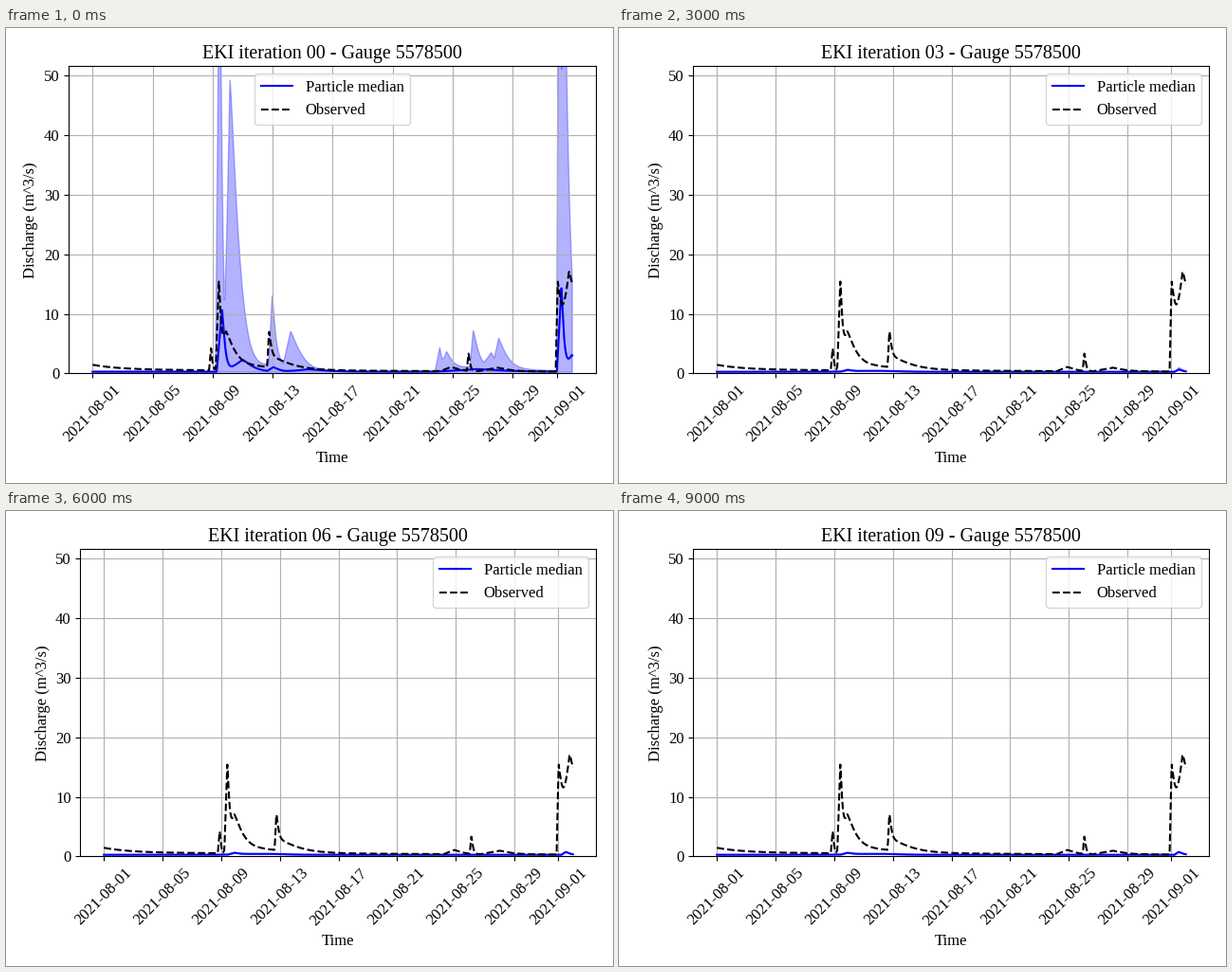
Recreate the animation shown at these times as a matplotlib script. Size 640 by 480 pixels, loop 10000 ms.

```python
import numpy as np
import matplotlib.pyplot as plt
from matplotlib.animation import FuncAnimation

W, H, DPI = 640, 480, 100
N_ITER, STEP_MS = 10, 1000
Y_MAX = 51.57
TICKS = list(range(0, 29, 4)) + [31]

plt.rcParams.update({"font.family": "Liberation Serif", "font.size": 12})

fig, ax = plt.subplots(figsize=(W / DPI, H / DPI), dpi=DPI)
days = np.linspace(0, 31.99, 32 * 48)


def date(day):
    month, day = divmod(day, 31)
    return f"2021-{8 + month:02d}-{day + 1:02d}"


def pulse(peak, height, rise, fall):
    """Flood wave: linear rise to the peak day, then a stretched decay."""
    dt = days - peak
    ramp = np.clip(1 + dt / rise, 0, 1)
    return height * ramp * np.exp(-(np.maximum(dt, 0) / fall) ** 1.3)


def flow(base, *events):
    return base + sum(pulse(*e) for e in events)


# Events are (peak day, height, rise days, fall days)
observed = flow(
    0.6 + 0.85 * np.exp(-days / 1.9) - 0.009 * days,
    (7.9, 3.7, 0.13, 0.1), (8.42, 12.6, 0.2, 0.15),
    (8.9, 5.1, 0.75, 0.65), (8.9, 1.3, 0.75, 3.3),
    (11.76, 4.2, 0.13, 0.16), (11.78, 2, 0.1, 1.5),
    (23.9, 0.7, 0.7, 0.6), (25.06, 3, 0.1, 0.13), (27, 0.6, 1.3, 0.9),
    (31.02, 15.3, 0.14, 0.28), (31.77, 16.4, 0.72, 1.1))

prior_upper = flow(
    0.4,
    (8.47, 78, 0.27, 0.2), (9.16, 48.5, 0.36, 0.7), (12.4, 1.4, 2, 0.6),
    (11.98, 11.5, 0.25, 0.26), (13.2, 6.3, 0.5, 0.85),
    (25.5, 0.8, 2.9, 3), (23.15, 3.8, 0.3, 0.2), (23.6, 2.8, 0.3, 0.5),
    (25.38, 6, 0.22, 0.4), (26.57, 2.4, 0.5, 0.4), (27.08, 4.4, 0.3, 0.7),
    (31.1, 85, 0.17, 0.3), (31.42, 55, 0.13, 0.45))

prior_median = flow(
    0.28,
    (8.63, 10.4, 0.35, 0.23), (10, 2, 1.1, 0.8), (12.05, 0.7, 0.4, 0.5),
    (14.35, 0.4, 1.6, 1.6), (25.6, 0.45, 2.8, 2.2),
    (31.26, 14, 0.3, 0.2), (31.95, 2.7, 0.5, 1))

first, last = pulse(8.9, 1, 0.45, 0.45), pulse(31.5, 1, 0.3, 0.33)
swell = 0.16 * np.exp(-((days - 10.8) / 2) ** 2)


def ensemble(k):
    """Lower, median and upper discharge for one iteration."""
    if k == 0:
        return np.full_like(days, 0.2), prior_median, prior_upper
    spread = np.exp(-0.8 * (k - 1))
    median = (0.28 + swell + (0.28 - 0.22 * spread) * first
              + 0.48 * (1 - spread) * last)
    high = median + spread * (1.2 * first + 2 * last)
    return median - 0.06 * spread, median, high


def draw(k):
    ax.clear()
    fig.subplots_adjust(left=(78.46 if k else 66) / W, right=622.4 / W,
                        top=1 - 40.1 / H, bottom=1 - 364.4 / H)
    low, median, high = ensemble(k)
    ax.fill_between(days, low, high, color="blue", alpha=0.3)
    ax.plot(days, median, color="blue", label="Particle median")
    ax.plot(days, observed, "k--", label="Observed")
    ax.set_ylim(0, Y_MAX)
    ax.set_xticks(TICKS, [date(d) for d in TICKS], rotation=45)
    ax.set_yticks(range(0, 51, 10))
    ax.set_xlabel("Time")
    ax.set_ylabel("Discharge (m^3/s)")
    ax.set_title(f"EKI iteration {k:02d} - Gauge 5578500", pad=5.5)
    ax.grid(True)
    ax.legend(loc="upper right" if k else "upper center")
    return []


anim = FuncAnimation(fig, draw, frames=N_ITER, interval=STEP_MS,
                     init_func=lambda: draw(0), repeat=True, repeat_delay=0)
plt.show()
```
